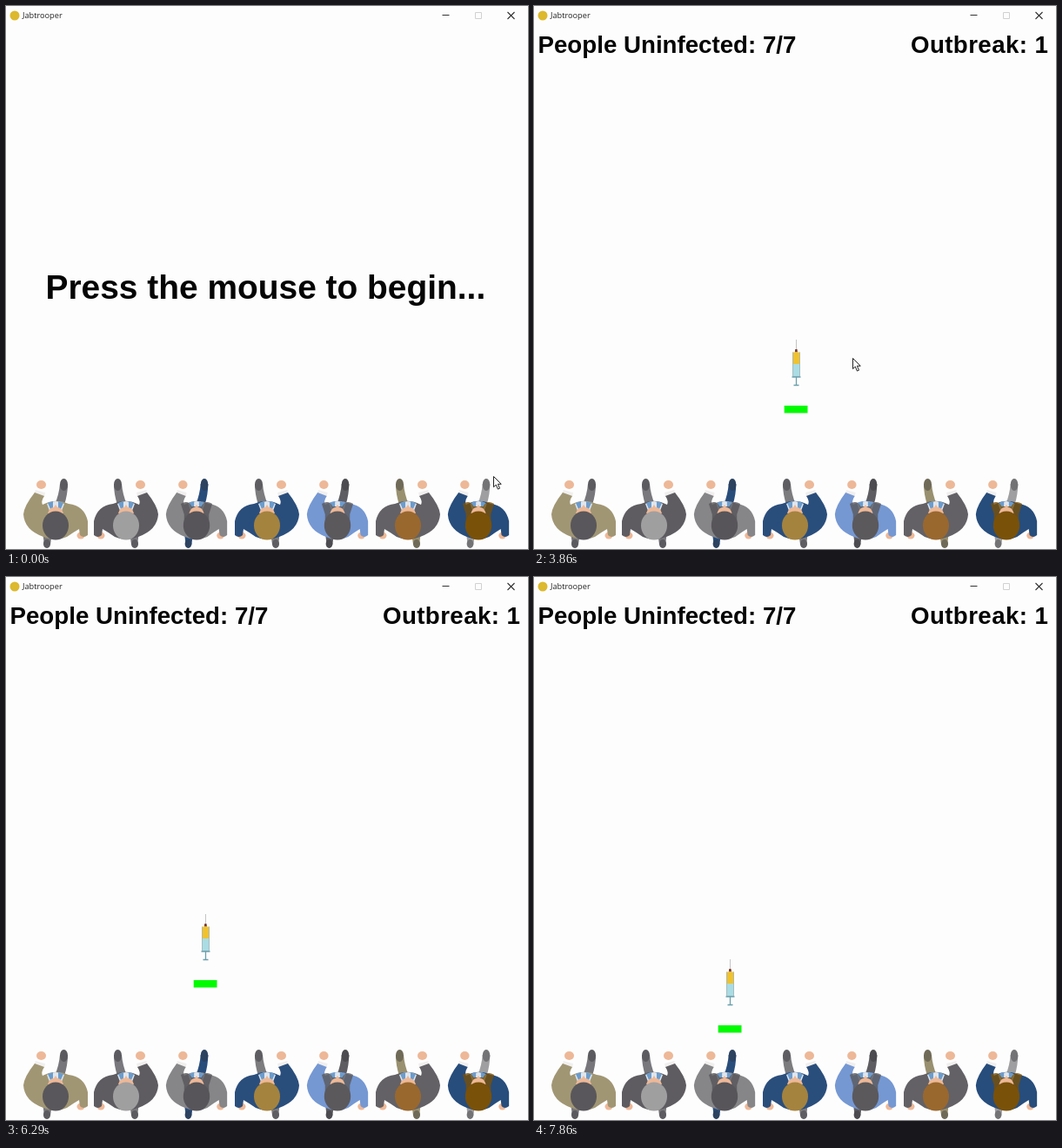
These frames come from a looping animation (600 by 625 pixels, 8000 ms). An HTML page:

```html
<!DOCTYPE html>
<html lang="en">
<head>
<meta charset="utf-8">
<title>Jabtrooper</title>
<style>
  html, body { margin: 0; width: 100%; height: 100%; overflow: hidden; background: #fefdfe; }
  svg { display: block; width: 600px; height: 625px; }
  .big { font-family: "Liberation Sans", Arial, sans-serif; font-weight: 700; fill: #050505; }
  .title { font: 9.2px "Open Sans", "Noto Sans", sans-serif; fill: #222; }
</style>
</head>
<body>
<svg viewBox="0 0 600 625">
  <rect width="600" height="625" fill="#fefdfe"/>
  <circle cx="10" cy="11" r="5.5" fill="#dcb92e"/>
  <text class="title" x="19" y="14">Jabtrooper</text>
  <g fill="none" stroke="#333">
    <path d="M501.5 10.5h8"/>
    <path d="M539.5 7.5h7v7h-7z" stroke="#d2d1d2"/>
    <path d="M576.5 7l8 8m0-8l-8 8" stroke-width="1.1"/>
  </g>

  <text id="prompt" class="big" x="45.5" y="337" font-size="38.9">Press the mouse to begin...</text>
  <g id="people"></g>

  <g id="game" class="big" font-size="27.7">
    <text x="4.5" y="54">People Uninfected: 7/7</text>
    <text x="433" y="54" letter-spacing=".4">Outbreak: 1</text>
    <g id="player">
      <path d="M.5-80v12" stroke="#c4c3c6"/>
      <path d="M-1.2-65.5l.5-3.5h2.2l.5 3.5z" fill="#7b3a2c"/>
      <rect x="-3.5" y="-65.5" width="8" height="13.5" fill="#f0c22d"/>
      <rect x="-3.5" y="-52" width="8" height="14" fill="#a9dce4"/>
      <path d="M-3.5-65.5v28h8v-28" fill="none" stroke="#9db0b4" stroke-width=".8"/>
      <path d="M-4.5-37h10M.5-37v9.5M-2.5-27.5h6" fill="none" stroke="#6aa0ac" stroke-width="1.3"/>
      <rect x="-13.3" y="-4" width="26.8" height="8.5" fill="#00fb00"/>
    </g>
  </g>

  <path id="cursor" d="M.5.5v12.2l2.8-2.6 2.1 5 2.1-.9-2.1-4.9h3.8z" fill="#fff" stroke="#222"/>
</svg>

<script>
const LOOP = 8000;
const FPS = 7;
const START = 27; // tick at which the game opens
const SKIN = "#edb897";
const $ = id => document.getElementById(id);

// jacket, hair, trousers
const crowd = [
  ["#a19674", "#59575b", "#77767a"],
  ["#5e5c60", "#a09fa0", "#79787c"],
  ["#868588", "#575559", "#294d7b"],
  ["#2a4e7c", "#a4833e", "#7c7b7e"],
  ["#7598d3", "#5b595c", "#5e5d61"],
  ["#636165", "#99682f", "#98906f"],
  ["#274d7c", "#795109", "#9f9ea0"]
];

const oval = (x, y, rx, ry, fill) =>
  `<ellipse cx="${x}" cy="${y}" rx="${rx}" ry="${ry}" fill="${fill}"/>`;
const shape = (d, fill, extra = "") => `<path d="${d}" fill="${fill}" ${extra}/>`;

function person([jacket, hair, trousers], i) {
  const long = i > 0 && i % 2 === 0;
  const facing = (i % 2 ? -1 : 1) * (long ? .95 : 1);
  const shade = "rgba(50,50,56,.4)";
  return `<g transform="translate(${57 + 81 * i} 597) scale(${facing} 1)">
    ${shape("M5-47h9q0 12-4 24h-11q5-12 6-24z", trousers)}
    ${oval(9.5, -46, 4.5, 7, trousers)}${oval(9.5, -46, 4.5, 7, shade)}
    ${shape("M-15 8h11l-2 15h-7z", trousers)}
    ${oval(-10, 22, 4, 5, trousers)}${oval(-10, 22, 4, 5, shade)}
    ${oval(29, 12.5, 4.5, 4, SKIN)}
    ${oval(-16.5, -46, 5.5, 5, SKIN)}
    ${shape("M-23-40l11 3l-1 5l-12-4z", "#f1efee")}
    ${shape("M-24-37l11 4q-4 6-2 10q15-8 30-1q18 2 22 20v16q-5 4-9 0l-1-7q-7 4-14 9q-13 6-27 0q-22-8-23-26q1-10 13-25z", jacket)}
    ${shape("M-10-24q10-6 20 0l-3 8h-14z", "#dfe6ee")}
    ${shape("M-9-25l6-2v9h-3zM9-25l-6-2v9h3z", "#6c9ccc")}
    ${long ? shape("M-19-24q9-5 13 3h12q4-8 13-3l-4 12v12h-30v-12z", hair, 'opacity=".8"') : ""}
    ${shape("M-9-13q2-7 7-7l2-3l2 3q5 0 7 7z", SKIN)}
    ${oval(0, 1, long ? 16 : 15, 16.5, hair)}
  </g>`;
}
$("people").innerHTML = crowd.map(person).join("");

// key points: tick, x, y
const cursorKeys = [[0, 560, 541], [13, 563, 508], [15, 504, 484], [17, 504, 484], [19, 366, 405]];
const playerKeys = [
  [START, 301, 464], [36, 301, 464], [37, 281, 464], [44, 229, 468], [46, 229, 498],
  [48, 273, 488], [50, 285, 418], [51, 237, 433], [55, 225, 520]
];

function show(el, on) {
  el.setAttribute("visibility", on ? "visible" : "hidden");
}

function place(el, keys, tick) {
  const next = keys.findIndex(k => k[0] > tick);
  const b = keys.at(next);
  const a = next > 0 ? keys[next - 1] : b;
  const p = a === b || next < 0 ? 0 : (tick - a[0]) / (b[0] - a[0]);
  const from = next < 0 ? b : a;
  const at = n => from[n] + (b[n] - from[n]) * p;
  el.setAttribute("transform", `translate(${at(1)} ${at(2)})`);
}

let first;
function draw(now) {
  first ??= now;
  const t = (now - first) % LOOP;
  const tick = Math.floor(t * FPS / 1000 + .05);
  const playing = tick >= START;
  show($("prompt"), !playing);
  show($("game"), playing);
  show($("cursor"), tick < 1 || tick >= 13 && tick <= START);
  place($("player"), playerKeys, tick);
  place($("cursor"), cursorKeys, tick);
  requestAnimationFrame(draw);
}
requestAnimationFrame(draw);
</script>
</body>
</html>
```
